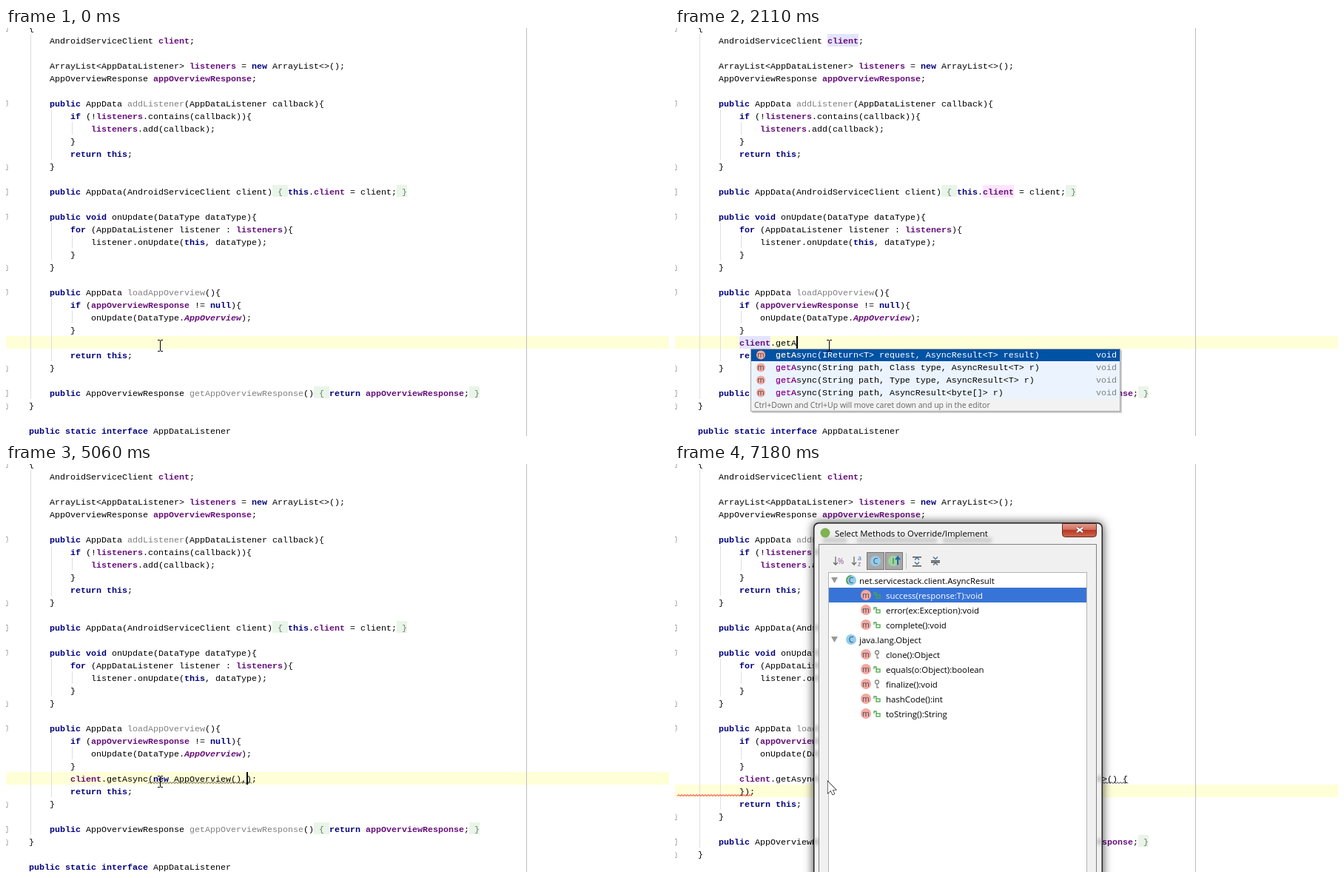
Recreate the animation shown at these times as an HTML page with a canvas. Size 896 by 551 pixels, loop 7990 ms.

```html
<!DOCTYPE html>
<html lang="en">
<head>
<meta charset="utf-8">
<title>Code completion</title>
<style>
html, body { margin: 0; width: 100%; height: 100%; overflow: hidden; background: #fff; }
canvas { display: block; }
</style>
</head>
<body>
<canvas id="stage" width="896" height="551"></canvas>
<script>
const ctx = document.getElementById('stage').getContext('2d');
const LOOP = 7990, LINE = 17, CHAR = 7, LEFT = 31;
const MONO = '11.667px "Liberation Mono", monospace';
const UI = '11.4px "Open Sans", sans-serif';
const KEYWORDS = new Set('public void return this for if new null static interface'.split(' '));

// Sigils: #field, ~unused method, @static field, ‹folded›
const CODE = `{
    AndroidServiceClient #client;

    ArrayList<AppDataListener> #listeners = new ArrayList<>();
    AppOverviewResponse #appOverviewResponse;

    public AppData ~addListener(AppDataListener callback){
        if (!#listeners.contains(callback)){
            #listeners.add(callback);
        }
        return this;
    }

    public AppData(AndroidServiceClient client)‹ { ›this.#client = client;‹ }›

    public void onUpdate(DataType dataType){
        for (AppDataListener listener : #listeners){
            listener.onUpdate(this, dataType);
        }
    }

    public AppData ~loadAppOverview(){
        if (#appOverviewResponse != null){
            onUpdate(DataType.@AppOverview);
        }

        return this;
    }

    public AppOverviewResponse ~getAppOverviewResponse()‹ { ›return #appOverviewResponse;‹ }›
}

public static interface AppDataListener`.split('\n');

const EDIT_ROW = 25, EDIT_X = LEFT + 8 * CHAR;
const CALL = 'client.getAsync(', FIRST = CALL + 'new AppOverview()';
const ASYNC_ITEMS = [
  ['m', 'getAsync(IReturn<T> request, AsyncResult<T> result)', 'void'],
  ['m', 'getAsync(String path, Class type, AsyncResult<T> r)', 'void'],
  ['m', 'getAsync(String path, Type type, AsyncResult<T> r)', 'void'],
  ['m', 'getAsync(String path, AsyncResult<byte[]> r)', 'void']];
const GET_ITEMS = [
  ['m', 'get(IReturn<T> request)', 'T'],
  ['m', 'get(String path, Class responseType)', 'T'],
  ['m', 'get(String path, Type responseType)', 'T'],
  ['m', 'get(String path)', 'HttpURLConnection'], ...ASYNC_ITEMS];
const OVERVIEW_ITEMS = [
  ['c', 'AppOverview', 'dto'], ['c', 'AppOverviewResponse', 'dto'],
  ['c', 'AppOverviewActivity', 'app'], ['c', 'AppOverviewFragment', 'app']];
const RESULT_ITEMS = [
  ['c', 'AsyncResult<T>', 'net.servicestack.client'], ['c', 'AsyncResultVoid', 'net.servicestack.client'],
  ['c', 'AsyncTask<Params, Progress, Result>', 'android.os'], ['c', 'AsyncServiceClient', 'net.servicestack.client'],
  ['c', 'AsyncQueryHandler', 'android.content'], ['c', 'AsyncTaskLoader<D>', 'android.content'],
  ['c', 'AsyncPlayer', 'android.media']];
const CLIENT_ITEMS = [['f', 'client', 'AndroidServiceClient']];

// [start ms, text before the caret, completion items]
const STEPS = [
  [0, ''], [530, 'c'], [810, 'cli', CLIENT_ITEMS], [1060, 'clien', CLIENT_ITEMS],
  [1310, 'client'], [1580, 'client.'], [1830, 'client.g', GET_ITEMS],
  [2110, 'client.getA', ASYNC_ITEMS], [2390, CALL], [2920, CALL + 'n'],
  [3200, CALL + 'new '], [3480, CALL + 'new Ap'], [3750, CALL + 'new AppOv', OVERVIEW_ITEMS],
  [4000, FIRST], [5060, FIRST + ','], [5340, FIRST + ', '], [5610, FIRST + ', new'],
  [5860, FIRST + ', new '], [6130, FIRST + ', new As'], [6410, FIRST + ', new Async', RESULT_ITEMS],
  [6680, FIRST + ', new AsyncResult<AppOverviewResponse>() {']];

function box(x, y, w, h, color) {
  ctx.fillStyle = color;
  ctx.fillRect(x, y, w, h);
}

function line(points, color, width = 1, close = false) {
  ctx.beginPath();
  points.forEach(p => ctx.lineTo(...p));
  if (close) ctx.closePath();
  ctx.strokeStyle = color;
  ctx.lineWidth = width;
  ctx.stroke();
}

function disc(x, y, r, color) {
  ctx.beginPath();
  ctx.arc(x, y, r, 0, 7);
  ctx.fillStyle = color;
  ctx.fill();
}

function text(str, x, y, color, font = UI, align = 'left') {
  ctx.font = font;
  ctx.fillStyle = color;
  ctx.textAlign = align;
  ctx.fillText(str, x, y);
}

const rowTop = row => row * LINE - 9;

function codeLine(source, row, x = LEFT) {
  for (const token of source.match(/‹[^›]*›|[#~@]?\w+|[^\w#~@‹]+/g) || []) {
    const mark = token[0];
    const str = token.replace(/[#~@‹›]/g, '');
    let color = '#000', style = '';
    if (KEYWORDS.has(str)) [color, style] = ['#000080', 'bold '];
    if (mark === '#') [color, style] = ['#660e7a', 'bold '];
    if (mark === '@') [color, style] = ['#660e7a', 'italic bold '];
    if (mark === '~') color = '#808080';
    if (mark === '‹') {
      box(x, rowTop(row), str.length * CHAR, LINE - 1, '#e9f5e9');
      color = '#6c7c6c';
    }
    text(str, x, row * LINE + 4, color, style + MONO);
    x += str.length * CHAR;
  }
}

function squiggle(from, to, row, color) {
  const points = [];
  for (let x = from; x <= to; x += 2) points.push([x, row * LINE + (points.length % 2 ? 4.5 : 6.5)]);
  line(points, color);
}

function editorFrame(shifted) {
  const at = row => row > EDIT_ROW ? row + shifted : row;
  box(0, 0, 896, 551, '#fff');
  box(0, rowTop(EDIT_ROW + shifted), 896, LINE, '#ffffd7');
  for (const [x, from, to] of [[33, 1, 29], [61, 7, 10], [61, 16, 18], [61, 22, 26], [89, 8, 8], [89, 17, 17], [89, 23, 23]])
    box(x, rowTop(from), 1, rowTop(at(to) + 1) - rowTop(from), '#dedede');
  box(703, 0, 1, 551, '#bdbdbd');
  const foldMarks = { 0: 'end', 6: 'start', 11: 'end', 13: 'box', 15: 'start', 19: 'end', 21: 'start', 27: 'end', 29: 'box', 30: 'end' };
  for (const row in foldMarks) {
    const y = at(+row) * LINE + .5, kind = foldMarks[row];
    line([[0, y - 4], [kind === 'end' ? 0 : 2, y - 4], [2, y - 2], [2, y + 2],
      [kind === 'start' ? 0 : 2, y + 4], [0, y + 4]], '#a0a0a0');
  }
  return at;
}

function popup(items, typed) {
  const prefix = typed.match(/\w*$/)[0];
  const textX = EDIT_X + (typed.length - prefix.length) * CHAR;
  const x = textX - 34, y = 433, hinted = items.length === 1;
  const w = hinted ? 417 : 500, h = items.length * LINE + 17;
  box(x + 2, y + 2, w, h, 'rgba(0,0,0,.2)');
  box(x, y, w, h, '#ebf4fe');
  items.forEach(([kind, label, type], i) => {
    const top = y + i * LINE, base = top + 12, chosen = i === 0;
    if (chosen) box(x, top, w, LINE, '#0052a4');
    disc(x + 14, top + 8.5, 6, { m: '#f3a9a0', c: '#9fd0ee', f: '#f5c98b' }[kind]);
    text(kind, x + 14, top + 12, '#444', '10px "Open Sans", sans-serif', 'center');
    text(label, textX, base, chosen ? '#fff' : '#000', MONO);
    text(label.slice(0, prefix.length), textX, base, chosen ? '#f9eccc' : '#b000b0', MONO);
    text(type, x + w - 5, base, chosen ? '#fff' : '#808080', MONO, 'right');
  });
  box(x, y + h - 17, w, 17, '#f2f2f2');
  text('Ctrl+Down and Ctrl+Up will move caret down and up in the editor', x + 5, y + h - 5, '#666', '10.5px "Open Sans", sans-serif');
  ctx.strokeStyle = '#a8a8a8';
  ctx.lineWidth = 1;
  ctx.strokeRect(x + .5, y + .5, w - 1, h - 1);
}

function editor(time) {
  const [start, typed, items] = STEPS.findLast(step => step[0] <= time);
  const shifted = +(start >= 6680);
  const at = editorFrame(shifted);
  const caretX = EDIT_X + typed.length * CHAR;
  const call = typed.includes('(');

  if (time >= 1580 && time < 2920) {
    box(206, rowTop(1), 42, LINE, '#e4e4ff');
    box(416, rowTop(13), 42, LINE, '#ffe4ff');
    box(EDIT_X, rowTop(EDIT_ROW), 42, LINE, '#e4e4ff');
  }
  if (typed === FIRST) box(caretX - 14, rowTop(EDIT_ROW), 14, LINE, '#99ccff');

  CODE.forEach((source, row) => codeLine(source, at(row + (row > 5 ? 0 : 0))));
  const tail = call && !shifted ? ');' : '';
  codeLine(typed.replace(/^client\b/, '#client') + tail, EDIT_ROW, EDIT_X);
  if (shifted) {
    codeLine('});', EDIT_ROW + 1, EDIT_X);
    squiggle(3, 103, EDIT_ROW + 1, '#f00');
    squiggle(192, 613, EDIT_ROW, '#333');
  } else {
    if (start >= 3200) squiggle(192, caretX + 7, EDIT_ROW, '#484840');
    else if (typed.endsWith('.')) squiggle(136, 142, EDIT_ROW, '#484840');
    if (typed) box(caretX, rowTop(EDIT_ROW), 2, LINE, '#000');
  }
  if (items) popup(items, typed);
}

function circleIcon(letter, x, y, color) {
  disc(x, y, 7, color);
  text(letter, x, y + 4, '#3a4a55', '10.5px "Open Sans", sans-serif', 'center');
}

function accessIcon(x, y, isProtected) {
  const color = isProtected ? '#858585' : '#4ba84b';
  ctx.strokeStyle = color;
  ctx.lineWidth = 1.3;
  if (isProtected) {
    ctx.beginPath();
    ctx.arc(x, y - 2.5, 2.5, 0, 7);
    ctx.stroke();
    line([[x, y], [x, y + 5], [x + 2.5, y + 5]], color, 1.3);
  } else {
    ctx.strokeRect(x - 1, y, 5, 4);
    line([[x - 1, y], [x - 1, y - 3], [x - 4, y - 3], [x - 4, y]], color, 1.3);
  }
}

function toolbar() {
  const arrow = x => line([[x, 125], [x, 136], [x - 3, 133], [x, 136], [x + 3, 133]], '#666', 1.2);
  arrow(217);
  text('%', 220, 135, '#93559b', '10px "Open Sans", sans-serif');
  arrow(242);
  text('a', 247, 130, '#3b72b8', '9px "Open Sans", sans-serif');
  text('z', 247, 138, '#93559b', '9px "Open Sans", sans-serif');
  for (const x of [259, 284]) {
    box(x, 119, 24, 24, '#777');
    box(x + 1, 120, 22, 22, '#a8a8a8');
  }
  circleIcon('C', 271, 131, '#91cdf0');
  circleIcon('I', 295, 131, '#9bd69b');
  line([[301, 136], [301, 126], [298, 129], [301, 126], [304, 129]], '#1767a8', 2);
  box(312, 120, 1, 22, '#c4c4c4');
  for (const [x, way] of [[327, 1], [352, -1]]) {
    for (const y of way > 0 ? [125, 137] : [130, 132]) box(x - 6, y, 12, 1.5, '#555');
    for (const side of [-1, 1]) {
      const tip = 131 + side * (way > 0 ? 4.5 : 2.5), base = tip + side * (way > 0 ? -3 : 3);
      line([[x - 3, base], [x, tip], [x + 3, base]], '#4a7598', 1.5);
    }
  }
}

const TREE = ['net.servicestack.client.AsyncResult', ' success(response:T):void', ' error(ex:Exception):void',
  ' complete():void', 'java.lang.Object', ' clone():Object', ' equals(o:Object):boolean',
  ' finalize():void', ' hashCode():int', ' toString():String'];

function dialog() {
  ctx.save();
  ctx.shadowColor = 'rgba(0,0,0,.75)';
  ctx.shadowBlur = 13;
  ctx.beginPath();
  ctx.roundRect(187, 79, 391, 520, 7);
  ctx.fillStyle = '#252525';
  ctx.fill();
  ctx.restore();
  ctx.beginPath();
  ctx.roundRect(188.5, 80.5, 388, 520, 6);
  ctx.fillStyle = '#f1f1f1';
  ctx.fill();

  // Code glimpsed through the frosted window frame
  ctx.save();
  ctx.clip();
  ctx.filter = 'blur(2px)';
  for (const [x, w] of [[200, 32], [246, 108], [362, 66]]) box(x, 99, w, 8, '#cfcfcf');
  for (const row of [7, 13, 15, 16, 17, 21, 22, 23, 25, 30]) box(189, row * LINE - 4, 5, 8, '#bbb');
  for (const row of [25, 30]) box(571, row * LINE - 4, 5, 8, '#bbb');
  ctx.restore();

  const red = ctx.createLinearGradient(0, 80, 0, 99);
  red.addColorStop(0, '#e2a093');
  red.addColorStop(.48, '#cf6c5c');
  red.addColorStop(.5, '#b93824');
  red.addColorStop(1, '#cf6a50');
  ctx.beginPath();
  ctx.roundRect(523.5, 80.5, 46, 18, [0, 0, 4, 4]);
  ctx.fillStyle = red;
  ctx.fill();
  ctx.strokeStyle = '#642d28';
  ctx.lineWidth = 1;
  ctx.stroke();
  for (const [color, width] of [['#5d3030', 4], ['#fff', 2.3]]) {
    line([[543, 86], [551, 92]], color, width);
    line([[551, 86], [543, 92]], color, width);
  }

  disc(203, 93, 6.5, '#7fb251');
  text('Select Methods to Override/Implement', 216, 98, '#000');
  box(194, 108, 376, 450, '#808080');
  box(195, 109, 374, 450, '#f0f0f0');
  toolbar();
  box(207, 146, 350, 410, '#b4b4b4');
  box(208, 147, 348, 410, '#fff');
  box(208, 167, 348, 20, '#3874d6');
  TREE.forEach((label, i) => {
    const y = 157 + i * 20, method = label[0] === ' ';
    if (method) {
      circleIcon('m', 258, y, '#f4a8a0');
      accessIcon(273, y, /clone|finalize/.test(label));
    } else {
      ctx.beginPath();
      [[211, y - 4], [220, y - 4], [215.5, y + 4]].forEach(p => ctx.lineTo(...p));
      ctx.fillStyle = '#999';
      ctx.fill();
      circleIcon('C', 238, y, '#91cdf0');
      if (i === 0) {
        ctx.beginPath();
        ctx.arc(238, y, 6, 2.2, 4.7);
        ctx.strokeStyle = '#50a850';
        ctx.lineWidth = 2;
        ctx.stroke();
      }
    }
    text(label.trim(), method ? 285 : 249, y + 5, i === 1 ? '#fff' : '#000');
  });
}

function pointer(isArrow) {
  if (!isArrow) {
    line([[208.5, 422], [208.5, 436]], '#000');
    for (const y of [421.5, 436.5]) {
      line([[205, y], [208, y]], '#000');
      line([[209, y], [212, y]], '#000');
    }
    return;
  }
  const shape = [[0, 0], [0, 16], [4, 12.5], [6.5, 18], [9, 17], [6.5, 11.5], [11, 11.5]]
    .map(([x, y]) => [x + 206.5, y + 428.5]);
  line(shape, '#000', 1.2, true);
  ctx.fillStyle = '#fff';
  ctx.fill();
}

function draw(time) {
  editor(time);
  if (time >= 6930) {
    ctx.save();
    if (time < 7180) {
      ctx.globalAlpha = .65;
      ctx.translate(384, 317);
      ctx.scale(.988, .988);
      ctx.translate(-384, -317);
    }
    dialog();
    ctx.restore();
  }
  pointer(time >= 6680);
}

const begin = performance.now();
function tick() {
  draw((performance.now() - begin) % LOOP);
  requestAnimationFrame(tick);
}
tick();
</script>
</body>
</html>
```
